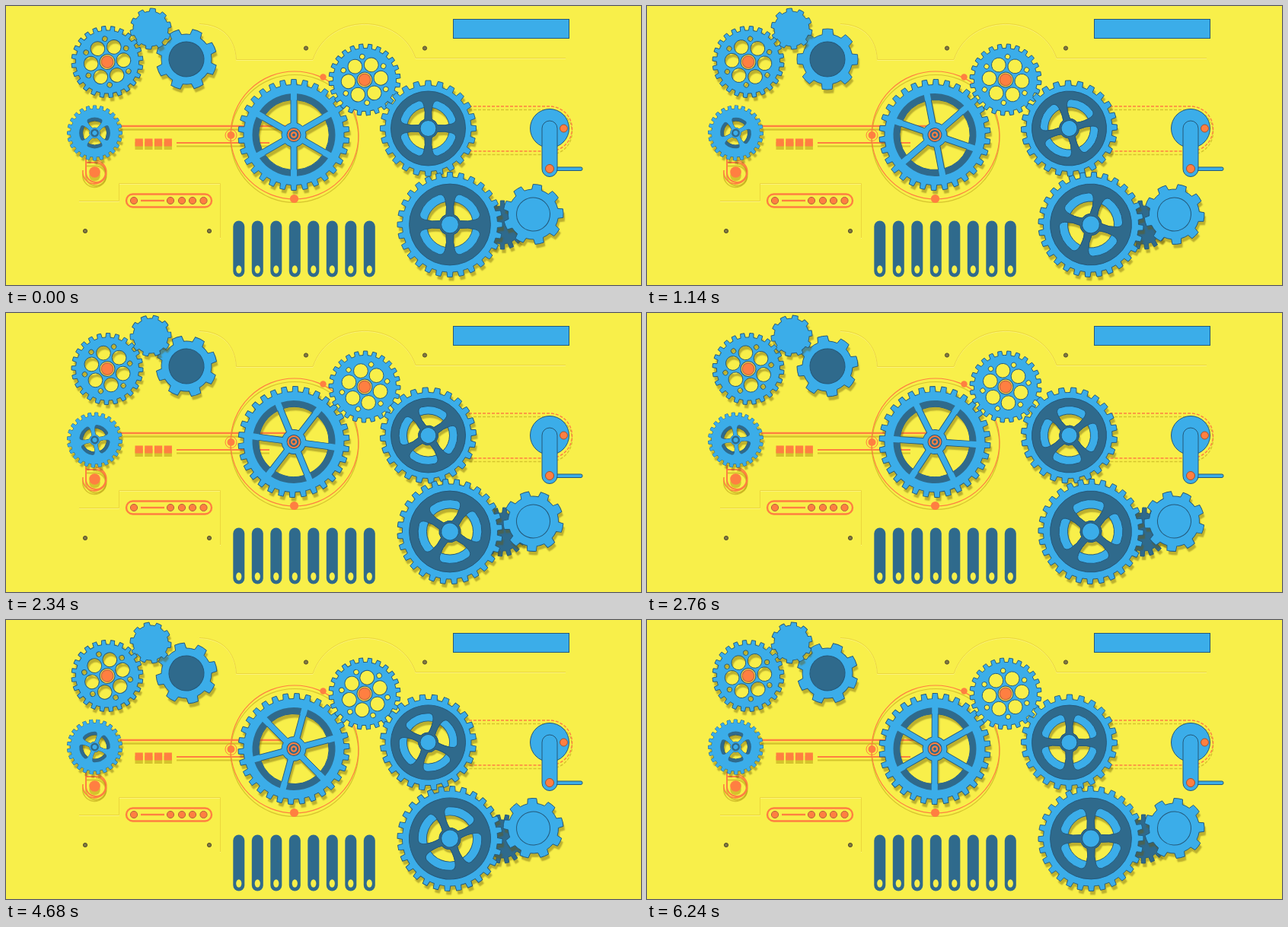
Write an HTML page with a canvas that moves like this. It is 834x367 px and loops after 6.27 s.

```html
<!DOCTYPE html>
<html lang="en">
<head>
<meta charset="utf-8">
<title>Gear machine</title>
<style>
  html, body { margin: 0; width: 100%; height: 100%; overflow: hidden; background: #f8ef4a; }
  canvas { display: block; width: 834px; height: 367px; }
</style>
</head>
<body>
<canvas id="stage" width="834" height="367"></canvas>
<script>
const LOOP = 6270, TAU = Math.PI * 2, TOP = -Math.PI / 2;
const YELLOW = '#f8ef4a', BLUE = '#3bade9', DARK = '#2f6a8c', ORANGE = '#ff7f41', EDGE = '#24587a';
const SHADE = 'rgba(105, 88, 10, .42)';
const ctx = document.getElementById('stage').getContext('2d');

// ---- path helpers -------------------------------------------------
function addCircle(p, x, y, r) {
  p.moveTo(x + r, y);
  p.arc(x, y, r, 0, TAU);
}

function disc(c, x, y, r, fill, line) {
  const p = new Path2D();
  addCircle(p, x, y, r);
  c.fillStyle = fill;
  c.fill(p);
  if (line) { c.strokeStyle = line; c.lineWidth = 1; c.stroke(p); }
}

// tip and foot are half widths as a share of the tooth pitch
function teeth(n, root, outer, tip = .21, foot = .28) {
  const p = new Path2D(), pitch = TAU / n;
  for (let i = 0; i < n; i++) {
    const a = TOP + i * pitch;
    p.arc(0, 0, root, a - (1 - foot) * pitch, a - foot * pitch);
    p.arc(0, 0, outer, a - tip * pitch, a + tip * pitch);
  }
  p.closePath();
  return p;
}

// openings between n straight spokes of half width w, from radius a to b
function addWindows(p, n, a, b, w) {
  const step = TAU / n, ia = Math.asin(w / a), ib = Math.asin(w / b);
  for (let i = 0; i < n; i++) {
    const s = TOP + i * step, e = s + step;
    p.moveTo(b * Math.cos(s + ib), b * Math.sin(s + ib));
    p.arc(0, 0, b, s + ib, e - ib);
    p.arc(0, 0, a, e - ia, s + ia, true);
    p.closePath();
  }
}

// openings of a cross whose arms flare into the rim
function addFlaredWindows(p, k) {
  for (let i = 0; i < 4; i++) {
    const cos = Math.cos(i * TAU / 4), sin = Math.sin(i * TAU / 4);
    const at = (x, y) => [k * (x * cos - y * sin), k * (x * sin + y * cos)];
    p.moveTo(...at(36, 13));
    p.quadraticCurveTo(...at(37, 8), ...at(31, 6));
    p.quadraticCurveTo(...at(22, 3), ...at(12, 4.5));
    p.quadraticCurveTo(...at(10, 10), ...at(4.5, 12));
    p.quadraticCurveTo(...at(3, 22), ...at(6, 31));
    p.quadraticCurveTo(...at(8, 37), ...at(13, 36));
    p.quadraticCurveTo(...at(30, 30), ...at(36, 13));
    p.closePath();
  }
}

function body(c, p, fill = BLUE, shade = SHADE) {
  c.save();
  c.shadowColor = shade;
  c.shadowOffsetX = 2;
  c.shadowOffsetY = 5;
  c.shadowBlur = 1.5;
  c.fillStyle = fill;
  c.fill(p, 'evenodd');
  c.restore();
  c.strokeStyle = EDGE;
  c.lineWidth = .9;
  c.stroke(p);
}

// ---- gear kinds ---------------------------------------------------
function holed(shade) {
  const p = teeth(24, 41.5, 47);
  for (let i = 0; i < 6; i++) {
    const a = TOP + i * TAU / 6, b = a + TAU / 12;
    addCircle(p, 21.5 * Math.cos(a), 21.5 * Math.sin(a), 9.4);
    addCircle(p, 30.5 * Math.cos(b), 30.5 * Math.sin(b), 3.3);
  }
  return c => {
    body(c, p, BLUE, shade);
    disc(c, 0, 0, 10, '#f3d34a', EDGE);
    disc(c, 0, 0, 7.8, ORANGE, '#b9603a');
  };
}

function spoked() {
  const p = teeth(30, 66, 73), rim = new Path2D();
  addWindows(p, 6, 16, 46, 4);
  addWindows(rim, 6, 46, 54.5, 4);
  return c => {
    body(c, p);
    c.fillStyle = DARK;
    c.fill(rim);
    disc(c, 0, 0, 9, ORANGE, EDGE);
    disc(c, 0, 0, 6.5, DARK);
    disc(c, 0, 0, 4.2, ORANGE);
    disc(c, 0, 0, 2, DARK);
  };
}

// a rim with a round opening, and a flared cross laid over it
function crossed(n, outer, k) {
  const rim = teeth(n, outer - 6.5, outer), plate = new Path2D();
  addCircle(rim, 0, 0, 28 * k);
  addCircle(plate, 0, 0, 49 * k);
  addFlaredWindows(plate, k);
  return c => {
    body(c, plate, DARK);
    body(c, rim);
    c.fillStyle = DARK;
    c.fill(plate, 'evenodd');
    c.stroke(plate);
    disc(c, 0, 0, 10.5 * k, BLUE, EDGE);
  };
}

function small() {
  const p = teeth(24, 31.5, 36), rim = new Path2D();
  addFlaredWindows(p, .53);
  addCircle(rim, 0, 0, 22);
  addCircle(rim, 0, 0, 16);
  return c => {
    body(c, rim, DARK);
    body(c, p);
    c.fillStyle = DARK;
    c.fill(rim, 'evenodd');
    c.fillStyle = BLUE;
    c.fill(p, 'evenodd');
    disc(c, 0, 0, 5.5, DARK);
    disc(c, 0, 0, 3, BLUE);
  };
}

function plain(n, root, outer, fill, hub, hubFill) {
  const p = teeth(n, root, outer);
  return c => {
    body(c, p, fill);
    if (hub) disc(c, 0, 0, hub, hubFill, EDGE);
  };
}

// x, y, start angle, turn per loop, painter
const gears = [
  [237, 70, -24, 135, plain(8, 33, 40, BLUE, 23, DARK)],
  [190, 30, 6, -72, plain(10, 23, 27, BLUE)],
  [133, 73.5, 24, 60, holed(SHADE)],
  [116.5, 167, 45, 90, small()],
  [378, 169.5, 0, -60, spoked()],
  [471, 97, 24, 60, holed('transparent')],
  [554.5, 161, 0, -90, crossed(24, 63, 1)],
  [652, 288, 0, -45, plain(16, 25, 32, DARK)],
  [583, 287.5, 0, 90, crossed(28, 69, 1.09)],
  [692.5, 274, 8, 40, plain(9, 33, 39.5, BLUE, 22, BLUE)]
];

// ---- fixed parts --------------------------------------------------
function pill(c, x, y, w, h, r, fill, line) {
  c.beginPath();
  c.roundRect(x, y, w, h, r);
  if (fill) { c.fillStyle = fill; c.fill(); }
  if (line) { c.strokeStyle = line; c.stroke(); }
}

function trace(c, d, color, width) {
  c.strokeStyle = color;
  c.lineWidth = width;
  c.stroke(new Path2D(d));
}

function drawBoard(c) {
  c.fillStyle = YELLOW;
  c.fillRect(0, 0, 834, 367);

  for (const d of [
    'M254 23.5C284 24 301 42 302.5 70.5H403C424 8 517 8 538 68.5H735',
    'M96 256.5H148.5V233.5H281.5V305'
  ]) {
    c.save();
    c.translate(0, 1);
    trace(c, d, '#fbf47c', 1);
    c.restore();
    trace(c, d, '#ecd63c', 1);
  }
  for (const [x, y] of [[394, 55.5], [550, 55.5], [104, 296], [267, 296]])
    disc(c, x, y, 2.6, '#817742', '#55502c');

  c.lineWidth = 1;
  c.fillStyle = BLUE;
  c.fillRect(587.5, 17.5, 152, 25);
  c.strokeStyle = EDGE;
  c.strokeRect(587.5, 17.5, 152, 25);

  for (let i = 0; i < 8; i++) {
    const x = 298.3 + i * 24.5;
    pill(c, x, 282.5, 15, 74, 7.5, DARK);
    c.beginPath();
    c.ellipse(x + 7.5, 346.5, 3.6, 5.2, 0, 0, TAU);
    c.fillStyle = YELLOW;
    c.fill();
  }

  // orange wiring with its soft drop shadow
  c.save();
  c.shadowColor = 'rgba(160, 130, 0, .4)';
  c.shadowOffsetY = 4.5;
  trace(c, 'M150 158H368', ORANGE, 2.5);
  trace(c, 'M224 180H346', ORANGE, 2.2);
  c.fillStyle = ORANGE;
  for (let i = 0; i < 4; i++) c.fillRect(169.5 + i * 12.7, 174.5, 10.3, 10);
  trace(c, 'M295 170A84 84 0 1 1 463 170A84 84 0 1 1 295 170', ORANGE, 1.2);
  trace(c, 'M105 200V220A13 13 0 1 0 118 206H105', ORANGE, 2);
  trace(c, 'M101 216A15.5 15.5 0 1 0 118 203', ORANGE, 1.6);
  disc(c, 116.5, 218.5, 7.3, ORANGE);
  c.setLineDash([4, 2]);
  trace(c, 'M608 132H714A29.5 29.5 0 0 1 714 191H608', ORANGE, 1.4);
  c.restore();

  trace(c, 'M288 170a7.5 7.5 0 1 1 15 0a7.5 7.5 0 1 1 -15 0', ORANGE, 1);
  disc(c, 295.5, 170, 5, ORANGE);
  disc(c, 416.5, 93.5, 4.2, ORANGE);
  disc(c, 378.5, 253.5, 5.6, ORANGE);

  c.lineWidth = 2.4;
  pill(c, 158, 247.5, 112, 17, 8.5, null, ORANGE);
  trace(c, 'M177 256H208', ORANGE, 2.4);
  for (const x of [168, 216, 231, 245, 259.5]) disc(c, x, 256, 4.6, ORANGE, '#b5623a');
}

function drawCrank(c) {
  disc(c, 714, 161, 25.5, BLUE, EDGE);
  disc(c, 732.5, 161, 5, ORANGE, '#a4502f');
  c.lineWidth = 1;
  pill(c, 720, 212, 37, 4.5, 2, BLUE, EDGE);
  pill(c, 704, 151, 20, 73.5, 10, BLUE, EDGE);
  disc(c, 714, 214, 5.5, ORANGE, '#a4502f');
}

const board = document.createElement('canvas');
board.width = 834;
board.height = 367;
drawBoard(board.getContext('2d'));

// ---- motion: steady turning, resting at the start and mid-loop -----
function clock(ms) {
  const t = Math.floor(ms % LOOP / 30) * 30;
  if (t < 150) return 0;
  if (t >= 2760 && t < 3840) return 2760;
  if (t >= 4680 && t < 4800) return 4680;
  return t;
}

function draw(now) {
  const k = clock(now) / LOOP;
  ctx.drawImage(board, 0, 0);
  for (const [x, y, start, turn, paint] of gears) {
    ctx.save();
    ctx.translate(x, y);
    ctx.rotate((start + turn * k) * Math.PI / 180);
    paint(ctx);
    ctx.restore();
  }
  drawCrank(ctx);
}

let origin = null;
function tick(now) {
  if (origin === null) origin = now;
  draw(Math.max(0, now - origin));
  requestAnimationFrame(tick);
}
draw(0);
requestAnimationFrame(tick);
</script>
</body>
</html>
```
